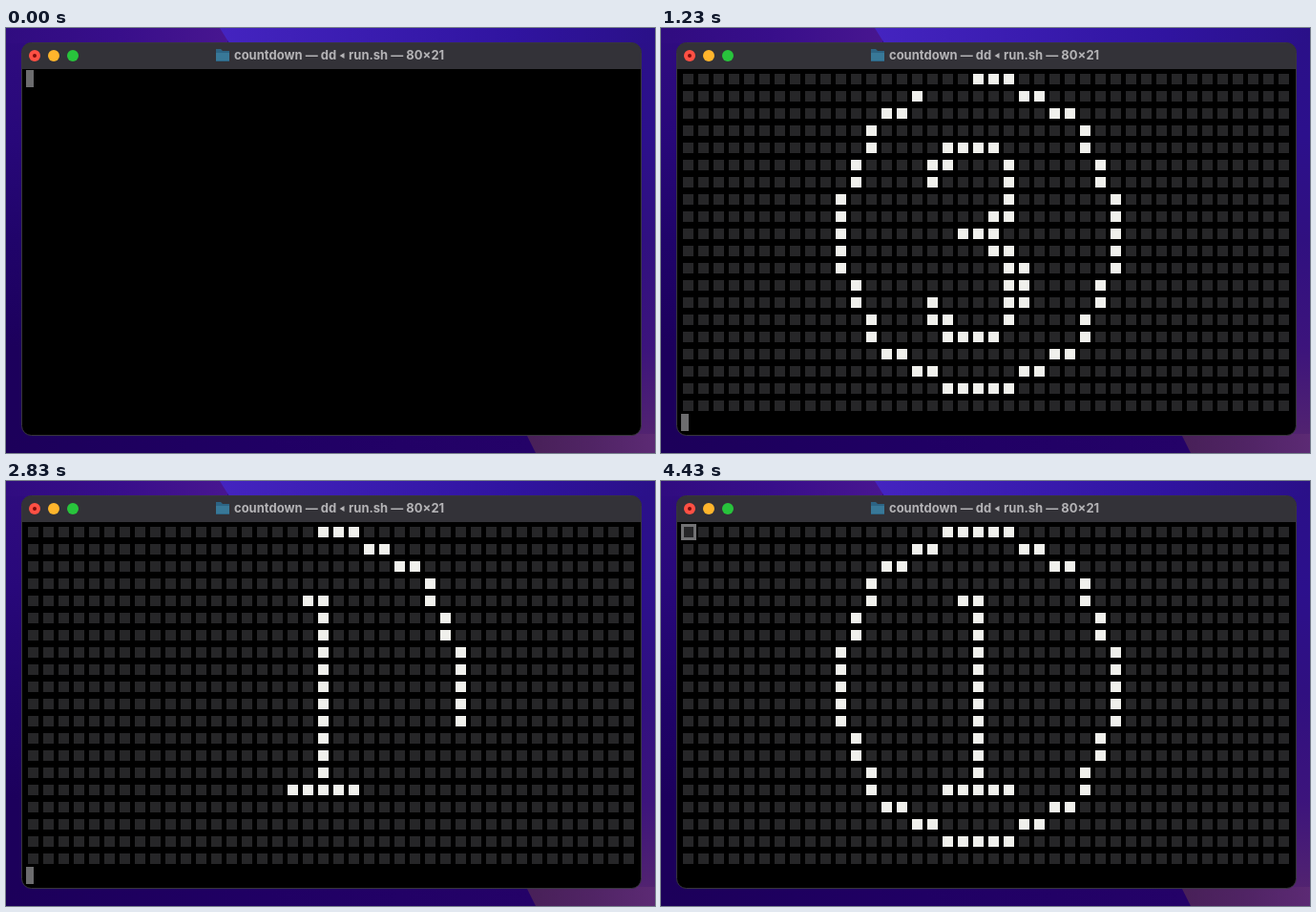
These frames come from a looping animation (680x445 px, 4.46 s). An HTML page with a canvas:

```html
<!DOCTYPE html>
<html lang="en">
<head>
<meta charset="utf-8">
<title>countdown</title>
<style>
  html, body { margin: 0; width: 100%; height: 100%; overflow: hidden; background: #000; }
  canvas { display: block; }
</style>
</head>
<body>
<canvas id="stage" width="680" height="445"></canvas>
<script>
const ctx = document.getElementById('stage').getContext('2d');
const LOOP = 4460, COLS = 40, ROWS = 20;
const GRID_START = 190;

// One clockwise sweep of the ring per digit, times in ms
const SWEEPS = [
  { start: 217, length: 1085, glyph: [
    '.####..', '##...#.', '#....#.', '.....#.', '....##.', '..###..',
    '....##.', '.....##', '.....##', '#....##', '##...#.', '.####..'] },
  { start: 1365, length: 1115, glyph: [
    '.####..', '##..##.', '#....#.', '.....#.', '.....#.', '....##.',
    '....#..', '...#...', '..#....', '.#.....', '#......', '#######'] },
  { start: 2480, length: 1210, glyph: [
    '..##...', ...Array(10).fill('...#...'), '.#####.'] },
];
const SWEEP_END = 3690;

function fill(color, x, y, w, h) {
  ctx.fillStyle = color;
  ctx.fillRect(x, y, w, h);
}

function shape(color, points) {
  ctx.fillStyle = color;
  ctx.beginPath();
  points.forEach(p => ctx.lineTo(...p));
  ctx.fill();
}

function dot(color, x, y, r) {
  ctx.fillStyle = color;
  ctx.beginPath();
  ctx.arc(x, y, r, 0, Math.PI * 2);
  ctx.fill();
}

function gradient(x0, y0, x1, y1, colors) {
  const g = ctx.createLinearGradient(x0, y0, x1, y1);
  colors.forEach((color, i) => g.addColorStop(i / (colors.length - 1), color));
  return g;
}

function drawWallpaper() {
  fill(gradient(0, 0, 0, 445, ['#300c80', '#28087a', '#20046a', '#1c005c', '#1c005a']), 0, 0, 340, 445);
  fill(gradient(0, 0, 0, 445, ['#2a1088', '#2c108c', '#301080', '#3c147c', '#56266e']), 340, 0, 340, 445);
  fill(gradient(0, 0, 232, 0, ['#300c80', '#380e8a', '#481690']), 0, 0, 232, 16);
  shape(gradient(224, 0, 680, 0, ['#4424c0', '#3a1cb0', '#3014a0', '#2a1088']),
    [[224, 0], [680, 0], [680, 16], [234, 16]]);
  fill(gradient(0, 0, 550, 0, ['#1c005a', '#200064', '#240268']), 0, 425, 555, 20);
  shape(gradient(545, 0, 680, 0, ['#482058', '#502464', '#5c2a74']),
    [[545, 425], [680, 425], [680, 445], [555, 445]]);
}

function drawWindow() {
  ctx.save();
  ctx.beginPath();
  ctx.roundRect(16.5, 15.5, 649, 411, 10);
  ctx.clip();
  fill('#000', 16, 15, 650, 412);
  fill('#333238', 16, 15, 650, 28);
  ctx.restore();
  ctx.strokeStyle = '#38363c';
  ctx.lineWidth = 1;
  ctx.stroke();

  dot('#ff5044', 30, 29, 6);
  dot('#7c0c0a', 30, 29, 2);
  dot('#ffb52c', 50, 29, 6);
  dot('#28c43c', 70, 29, 6);

  shape('#2c6484', [[220, 22], [225, 22], [227, 24], [234, 24], [234, 35], [220, 35]]);
  fill('#387898', 220, 26, 14, 8);

  ctx.font = 'bold 13px Inter, sans-serif';
  ctx.fillStyle = '#b4b3b6';
  ctx.fillText('countdown — dd', 239, 33);
  ctx.fillText('run.sh — 80×21', 359, 33);
  shape('#b4b3b6', [[349.5, 29], [354.5, 26], [354.5, 32]]);
}

function inRing(dx, dy) {
  const d = dx * dx + dy * dy;
  return d >= 73 && d <= 85;
}

function drawGrid(t) {
  const sweep = SWEEPS.findLast(s => t >= s.start) || SWEEPS[0];
  const reach = Math.min(1, Math.max(0, (t - sweep.start) / sweep.length));
  for (let row = 0; row < ROWS; row++) {
    for (let col = 0; col < COLS; col++) {
      const dx = col - 19, dy = row - 9;
      const turn = (Math.atan2(dx, -dy) / (2 * Math.PI) + 1) % 1;
      const lit = (inRing(dx, dy) && turn <= reach) || sweep.glyph[row - 4]?.[col - 16] === '#';
      fill(lit ? '#f0f0ec' : '#262628', 23 + 16 * col, 48 + 18 * row, 11, 11);
    }
  }
}

function drawCursor(t) {
  if (t >= SWEEP_END) {
    ctx.strokeStyle = '#727274';
    ctx.lineWidth = 3;
    ctx.strokeRect(22.5, 46.5, 13, 14);
  } else {
    fill('#6c6c6e', 21, t < GRID_START ? 44 : 404, 8, 18);
  }
}

function draw() {
  const t = performance.now() % LOOP;
  drawWallpaper();
  drawWindow();
  if (t >= GRID_START) drawGrid(t);
  drawCursor(t);
  requestAnimationFrame(draw);
}
draw();
</script>
</body>
</html>
```
